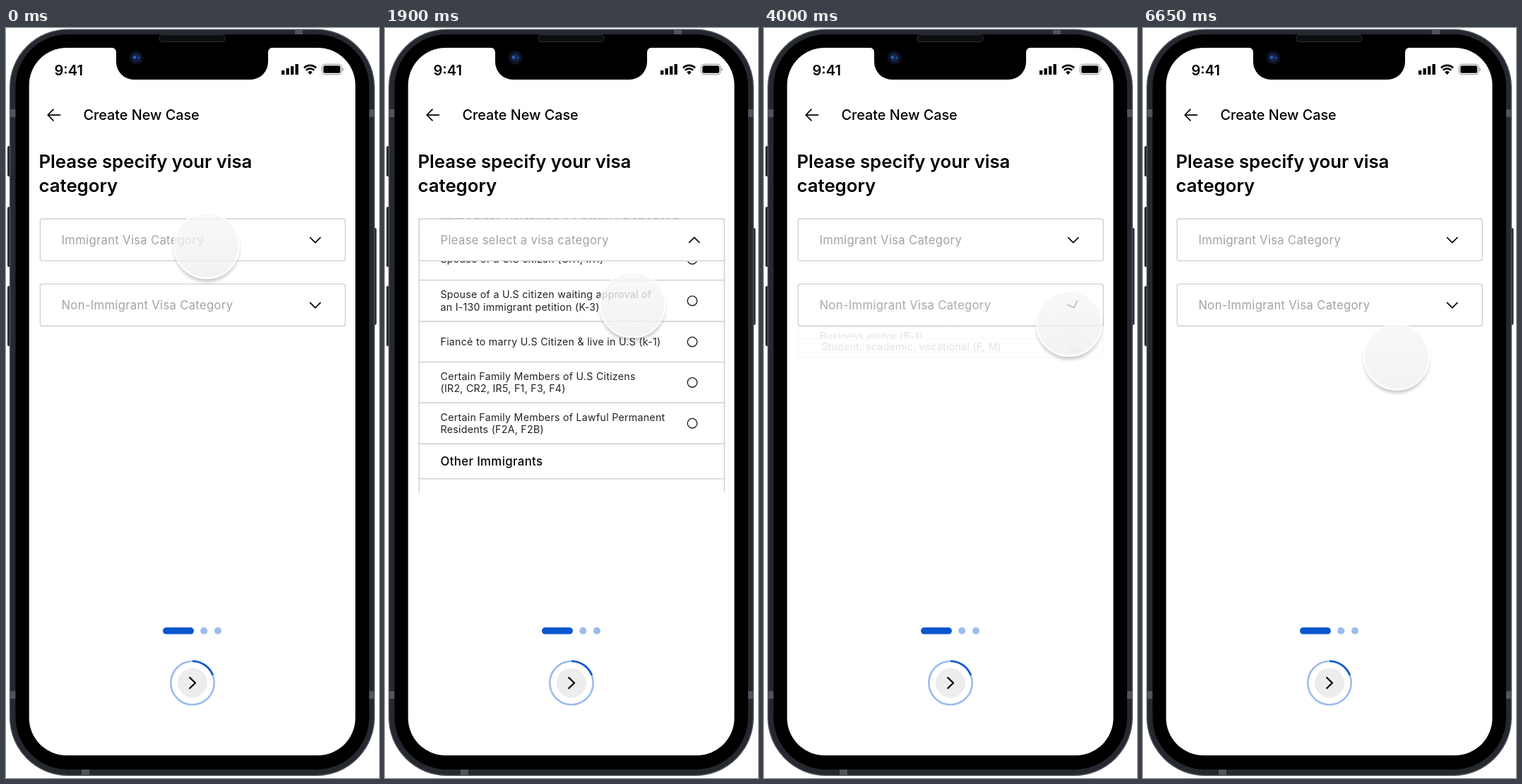
An HTML page for the animation above (6800 ms loop, 528 by 1061 pixels).

```html
<!DOCTYPE html>
<html lang="en">
<head>
<meta charset="utf-8">
<title>Visa category picker</title>
<style>
  html, body { margin: 0; width: 100%; height: 100%; overflow: hidden; background: #fff; }
  svg { display: block; width: 100vw; height: 100vh; }
  text { font-family: Inter, Roboto, sans-serif; font-optical-sizing: none; fill: #000; white-space: pre; }
  .label { font-size: 16.6px; letter-spacing: .34px; fill: #a2a2a2; }
  .head { font-size: 16.8px; letter-spacing: .36px; font-weight: 500; fill: #050505; }
  .item { font-size: 14.2px; letter-spacing: .27px; fill: #222; }
  .edge { stroke: #cfcfcf; stroke-width: 1.3; }
  .radio { fill: none; stroke: #222; stroke-width: 1.4; }
  .line { fill: none; stroke: #000; stroke-width: 1.75; stroke-linecap: round; stroke-linejoin: round; }
</style>
</head>
<body>
<svg viewBox="0 0 528 1061" preserveAspectRatio="none">
  <defs>
    <clipPath id="listClip"><rect id="listClipRect" x="46" y="269" width="437" height="388"/></clipPath>
    <linearGradient id="puck" x2="0" y2="1">
      <stop offset="0" stop-color="#f7f7f7"/>
      <stop offset="1" stop-color="#efefef"/>
    </linearGradient>
    <filter id="shadow" x="-30%" y="-30%" width="160%" height="170%">
      <feDropShadow dx="0" dy="5" stdDeviation="2.8" flood-color="#000" flood-opacity=".28"/>
    </filter>
  </defs>

  <!-- phone body -->
  <g fill="#2b2e34">
    <rect x="2" y="167" width="6" height="43" rx="2"/>
    <rect x="2" y="253" width="6" height="85" rx="2"/>
    <rect x="2" y="365" width="6" height="85" rx="2"/>
    <rect x="518.5" y="283" width="6" height="137" rx="2"/>
  </g>
  <rect x="5.7" y="2.2" width="515.6" height="1055" rx="82" fill="#25282e" stroke="#4a4e56" stroke-width="1.5"/>
  <g fill="#50545b">
    <rect x="5" y="115" width="9" height="11"/><rect x="513" y="115" width="9" height="11"/>
    <rect x="5" y="938" width="9" height="11"/><rect x="513" y="938" width="9" height="11"/>
    <rect x="409" y="2" width="11" height="8"/><rect x="107" y="1049" width="11" height="8"/>
  </g>
  <rect x="13.5" y="9" width="500.5" height="1040" rx="74"/>
  <rect x="217" y="9.5" width="93" height="10" rx="4" fill="#0c0d0f" stroke="#2c2f34"/>
  <rect x="32.7" y="28" width="461.8" height="1001" rx="53" fill="#fff"/>
  <path d="M149 27.5q7 .5 7 7.500V48a25 25 0 0 0 25 25H346a25 25 0 0 0 25-25V35q0-7 7-7.500Z"/>
  <circle cx="184.500" cy="42" r="10" fill="#0d1120"/>
  <circle cx="184.500" cy="42" r="6" fill="#13244a"/>
  <circle cx="182" cy="41.500" r="2.300" fill="#2f5fb5"/>
  <circle cx="188" cy="42" r="1.600" fill="#234a90"/>

  <!-- status bar -->
  <text x="68.500" y="67.200" font-size="20.1" font-weight="600">9:41</text>
  <path d="M390 60h4.300v6h-4.300zM396.500 57h4.300v9h-4.300zM403 54h4.300v12h-4.300zM409.500 51h4.300v15h-4.300z"/>
  <g fill="none" stroke="#000" stroke-width="2.7">
    <path d="M422 56.500a12 12 0 0 1 17 0M424.800 59.800a8 8 0 0 1 11.400 0"/>
  </g>
  <path d="M430.500 66l-3.200-3.600a4.600 4.600 0 0 1 6.400 0Z"/>
  <rect x="447.300" y="51.300" width="28" height="14.500" rx="4.300" fill="none" stroke="#000" stroke-opacity=".45"/>
  <rect x="449.300" y="53.300" width="24" height="10.500" rx="2.600"/>
  <path d="M476.600 56.300q2.400 2.200 0 4.600Z" fill="#777"/>

  <!-- page header -->
  <path class="line" d="M76.500 123H59.500M67 115.200L59.200 123L67 130.800"/>
  <text x="109.500" y="130.300" font-size="19.8" font-weight="500">Create New Case</text>
  <g font-size="25.75" font-weight="600">
    <text x="46.500" y="197.500">Please specify your visa</text>
    <text x="46.500" y="232.300">category</text>
  </g>

  <!-- pager and next button -->
  <rect x="222" y="848" width="44" height="9.600" rx="4.800" fill="#0a56d0"/>
  <circle cx="280.200" cy="852.800" r="5" fill="#9dbcec"/>
  <circle cx="300" cy="852.800" r="5" fill="#9dbcec"/>
  <g fill="none" stroke-width="2.600">
    <circle cx="264" cy="926.500" r="30.700" stroke="#9dbcec"/>
    <path d="M264 895.800A30.700 30.700 0 0 1 292.700 915.500" stroke="#0a56d0"/>
  </g>
  <circle cx="264" cy="926.500" r="21" fill="#ededed"/>
  <path class="line" style="stroke-width:2.3" d="M260.200 919l7.800 7.500l-7.800 7.500"/>

  <g id="ui"></g>

  <g id="cursor" opacity=".78">
    <circle r="46" fill="url(#puck)" filter="url(#shadow)"/>
    <circle r="46" fill="none" stroke="#fff" stroke-width="2.4"/>
  </g>
</svg>

<script>
const LOOP = 6800, LEFT = 48.3, WIDTH = 432, SCROLL = 186;
const $ = id => document.getElementById(id);
const lerp = (a, b, p) => a + (b - a) * p;
const clamp = v => Math.max(0, Math.min(1, v));
const ease = v => { v = clamp(v); return v * v * (3 - 2 * v); };

function add(parent, tag, attrs = {}, text) {
  const el = document.createElementNS('http://www.w3.org/2000/svg', tag);
  for (const k in attrs) el.setAttribute(k, attrs[k]);
  if (text) el.textContent = text;
  return parent.appendChild(el);
}
const set = (el, attrs) => { for (const k in attrs) el.setAttribute(k, attrs[k]); };

// A row's content is laid out around its vertical middle.
function addRow(parent, { h, lines, head, dx = 0, dy = 0 }, radioX) {
  const g = add(parent, 'g');
  const box = add(g, 'rect', { x: LEFT, width: WIDTH, height: h, fill: '#fff', class: 'edge' });
  const body = add(g, 'g');
  const size = head ? 16.8 : 14.2;
  lines.forEach((s, i) => add(body, 'text', {
    x: 78.5 + dx,
    y: dy + (i - (lines.length - 1) / 2) * 17.4 + size * .3635,
    class: head ? 'head' : 'item'
  }, s));
  if (!head) add(body, 'circle', { cx: radioX + dx, cy: dy, r: 6.8, class: 'radio' });
  return (top, height) => {
    set(box, { y: top, height });
    set(body, { transform: `translate(0 ${top + height / 2})` });
  };
}

function addList(parent, top, rows, radioX) {
  let y = top;
  return rows.map(r => {
    const row = { top: y, h: r.h, place: addRow(parent, r, radioX) };
    row.place(y, r.h);
    y += r.h;
    return row;
  });
}

function addField(parent, top, name) {
  const g = add(parent, 'g');
  add(g, 'rect', { x: LEFT, y: top, width: WIDTH, height: 59.3, rx: 3, fill: '#fff', class: 'edge' });
  const y = top + 35.5;
  const closed = add(g, 'text', { x: 78.5, y, class: 'label' }, name);
  const open = add(g, 'text', { x: 78.5, y, class: 'label' }, 'Please select a visa category');
  const chevron = add(g, 'path', { d: 'M-7.200-3.500L0 3.700L7.200-3.500', class: 'line' });
  return {
    g,
    show(p) {
      set(closed, { opacity: 1 - p });
      set(open, { opacity: p });
      set(chevron, { transform: `translate(437.800 ${top + 30}) rotate(${-180 * p})` });
    }
  };
}

const ui = $('ui');
const listA = add(ui, 'g', { 'clip-path': 'url(#listClip)' });
const scroller = add(listA, 'g');
addList(scroller, 329.5, [
  { h: 50.5, head: true, lines: ['Immediate Relatives & Family Sponsored'] },
  { h: 59, lines: ['Spouse of a U.S citizen (CR1, IR1)'] },
  { h: 58.5, lines: ['Spouse of a U.S citizen waiting approval of', 'an I-130 immigrant petition (K-3)'] },
  { h: 57.5, lines: ['Fiancé to marry U.S Citizen & live in U.S (k-1)'] },
  { h: 57.5, lines: ['Certain Family Members of U.S Citizens', '(IR2, CR2, IR5, F1, F3, F4)'] },
  { h: 58, lines: ['Certain Family Members of Lawful Permanent', 'Residents (F2A, F2B)'] },
  { h: 49.5, head: true, lines: ['Other Immigrants'] },
  { h: 57.5, lines: ['Diversity Immigrant Visa (DV)'] },
  { h: 58.5, lines: ['Returning Residents (SB)'] }
], 435);
const fieldA = addField(ui, 270, 'Immigrant Visa Category');

const listB = add(ui, 'g');
const rowsB = addList(listB, 421.5, [
  { h: 51, head: true, lines: ['Purpose of Travel'] },
  { h: 58, lines: ['Athlete, amateur or professional (competing', 'for prize money only) (B-1)'] },
  { h: 56.5, lines: ['Au pair (exchange visitor) (J)'] },
  { h: 57, lines: ['Business visitor (B-1)'] },
  { h: 58.5, lines: ['Student: academic, vocational (F, M)'], dx: 2.5, dy: -2 }
], 437.5);
const fieldB = addField(ui, 362.2, 'Non-Immigrant Visa Category');

// time, x, y
const path = [
  [0, 284, 308], [300, 290, 300], [600, 310, 345], [900, 340, 430], [1400, 349, 438],
  [1800, 350, 400], [2300, 352, 358], [2800, 368, 322], [3000, 369, 326], [3200, 371, 355],
  [3600, 425, 405], [4000, 432, 418], [4300, 430, 480], [4700, 395, 620], [5000, 290, 640],
  [5250, 310, 530], [5500, 360, 428], [5900, 359, 423], [6500, 359, 423], [6650, 359, 465.5]
];

function cursorAt(t) {
  let i = 0;
  while (i < path.length - 2 && path[i + 1][0] <= t) i++;
  const [t0, x0, y0] = path[i], [t1, x1, y1] = path[i + 1];
  const p = clamp((t - t0) / (t1 - t0));
  return [lerp(x0, x1, p), lerp(y0, y1, p)];
}

const ramp = (t, from, to) => ease((t - from) / (to - from));

function draw(t) {
  const a = ramp(t, 300, 700) - ramp(t, 2920, 3335);
  const b = ramp(t, 3910, 4320) - ramp(t, 5930, 6330);
  const scroll = ramp(t, 850, 1400) - ramp(t, 1550, 2200);

  set(listA, { opacity: a, display: a > 0 ? 'inline' : 'none' });
  set($('listClipRect'), { height: lerp(61, 388, a) });
  set(scroller, { transform: `translate(0 ${-SCROLL * scroll})` });
  fieldA.show(a);

  set(listB, { opacity: b, display: b > 0 ? 'inline' : 'none' });
  rowsB.forEach((r, i) => r.place(lerp(367 + 11 * i, r.top, b), lerp(22, r.h, b)));
  fieldB.show(b);
  set(fieldB.g, { opacity: clamp((1 - a) * 1.35) });

  set($('cursor'), { transform: `translate(${cursorAt(t)})` });
}

// The motion advances in 100 ms steps, with a longer hold before the last one.
const step = t => t >= 6650 ? 6650 : Math.min(6500, Math.floor(t / 100) * 100);

const start = performance.now();
function tick() {
  draw(step((performance.now() - start) % LOOP));
  requestAnimationFrame(tick);
}
tick();
</script>
</body>
</html>
```
